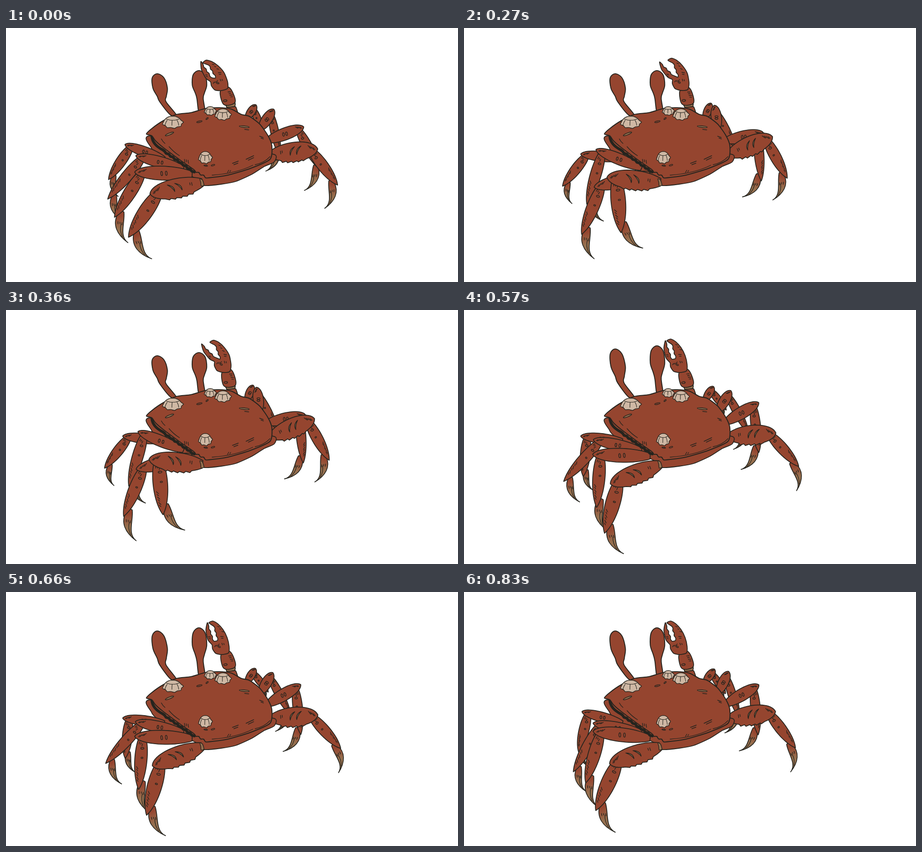
An HTML page with a canvas for the animation above (900 ms loop, 998 px wide and 561 px high).

```html
<!DOCTYPE html>
<html lang="en">
<head>
<meta charset="utf-8">
<title>Walking crab</title>
<style>
  html, body { margin: 0; width: 100%; height: 100%; overflow: hidden; background: #fff; }
  canvas { display: block; width: 100%; height: 100%; }
</style>
</head>
<body>
<canvas id="stage" width="998" height="561"></canvas>
<script>
const ctx = document.getElementById('stage').getContext('2d');
const RED = '#95452f', INK = '#25241e', SHELL = '#cfb8a4', HORN = '#96704f';
const POSES = 6, LOOP = 900, FIRST = 120, STEP = 150;
const rad = d => d * Math.PI / 180;

function paint(fill, width = 1.8) {
  if (fill) { ctx.fillStyle = fill; ctx.fill(); }
  ctx.strokeStyle = INK;
  ctx.lineWidth = width;
  ctx.stroke();
}

// Closed curve through the points; tension 0 gives straight edges.
function blob(pts, tension = 1) {
  const n = pts.length, k = tension / 6;
  ctx.beginPath();
  ctx.moveTo(...pts[0]);
  for (let i = 0; i < n; i++) {
    const a = pts[(i + n - 1) % n], b = pts[i], c = pts[(i + 1) % n], d = pts[(i + 2) % n];
    ctx.bezierCurveTo(b[0] + (c[0] - a[0]) * k, b[1] + (c[1] - a[1]) * k,
      c[0] - (d[0] - b[0]) * k, c[1] - (d[1] - b[1]) * k, c[0], c[1]);
  }
  ctx.closePath();
}

// Points from a to b that step aside at every other point.
function ragged(a, b, count, depth) {
  const dx = b[0] - a[0], dy = b[1] - a[1], len = Math.hypot(dx, dy);
  return Array.from({ length: count + 1 }, (_, i) => {
    const t = i / count, off = i % 2 ? depth / len : 0;
    return [a[0] + dx * t - dy * off, a[1] + dy * t + dx * off];
  });
}

function turned([x, y], cx, cy, deg) {
  const c = Math.cos(rad(deg)), s = Math.sin(rad(deg));
  return [cx + (x - cx) * c - (y - cy) * s, cy + (x - cx) * s + (y - cy) * c];
}

function arc(x1, y1, cx, cy, x2, y2, width = 1.4) {
  ctx.beginPath();
  ctx.moveTo(x1, y1);
  ctx.quadraticCurveTo(cx, cy, x2, y2);
  paint(null, width);
}

function slit(x, y, rx, ry, turn = 0, fill = RED) {
  ctx.beginPath();
  ctx.ellipse(x, y, rx, ry, rad(turn), 0, 7);
  paint(fill, 1.4);
}

function hatch(x, y, dx, dy, lx, ly, count) {
  for (let i = 0; i < count; i++) {
    const cut = i % 2 ? 0.7 : 1, px = x + dx * i, py = y + dy * i;
    arc(px, py, px, py, px + lx * cut, py + ly * cut);
  }
}

// Runs draw(length) with the x axis along a-b; +y is the inner side.
function along(a, b, side, draw) {
  const dx = b[0] - a[0], dy = b[1] - a[1];
  ctx.save();
  ctx.translate(...a);
  ctx.rotate(Math.atan2(dy, dx));
  ctx.scale(1, side);
  draw(Math.hypot(dx, dy));
  ctx.restore();
}

function spindle(len, w, root, c1, c2, toothed) {
  const N = 22, top = [], low = [];
  for (let i = 0; i <= N; i++) {
    const t = i / N, s = 1 - t;
    const x = len * (3 * s * s * t * c1 + 3 * s * t * t * c2 + t ** 3);
    const y = w * (s ** 3 * root + 3 * s * s * t * 0.64 + 3 * s * t * t * 0.6);
    const tooth = toothed && i > 4 && i < 14 && i % 2 ? 3 : 0;
    top.push([x, -y]);
    low.unshift([x - tooth, y + tooth]);
  }
  blob(top.concat(low), 0);
  paint(RED);
}

function upper(len, w) {
  const big = w > 35;
  spindle(len, w, 0.2, 0.3, 0.92, big);
  hatch(len * 0.8, -w * 0.24, len * 0.035, w * 0.05, len * 0.045, w * 0.17, 4);
  if (big) {
    for (const t of [0.48, 0.62]) {
      ctx.beginPath();
      ctx.moveTo(len * (t + 0.03), -w * 0.26);
      ctx.quadraticCurveTo(len * (t - 0.1), -w * 0.12, len * (t - 0.08), w * 0.16);
      ctx.quadraticCurveTo(len * (t - 0.06), -w * 0.06, len * (t + 0.03), -w * 0.26);
      paint(HORN, 1.5);
    }
    hatch(len * 0.2, -w * 0.12, len * 0.035, 0, 0, w * 0.16, 2);
  } else {
    slit(len * 0.45, 0, 2, w * 0.15, 8);
    slit(len * 0.53, w * 0.03, 2, w * 0.15, 8);
  }
}

function shin(len, w) {
  spindle(len, w, 0.25, 0.22, 0.76);
  hatch(len * 0.1, -w * 0.2, 2, w * 0.12, 5, -1, 3);
  slit(len * 0.22, w * 0.05, 2, w * 0.13);
  slit(len * 0.4, w * 0.08, 1.5, w * 0.08);
  hatch(len * 0.57, -w * 0.32, len * 0.05, w * 0.025, 5, w * 0.14, 6);
}

function hook(len) {
  const tint = ctx.createLinearGradient(0, 0, len, 0);
  tint.addColorStop(0.1, RED);
  tint.addColorStop(0.5, HORN);
  ctx.beginPath();
  ctx.moveTo(0, -len * 0.1);
  ctx.bezierCurveTo(len * 0.3, -len * 0.36, len * 0.65, -len * 0.3, len, 0);
  ctx.bezierCurveTo(len * 0.72, -len * 0.24, len * 0.35, len * 0.06, 0, len * 0.1);
  ctx.quadraticCurveTo(-len * 0.12, 0, 0, -len * 0.1);
  paint(tint);
  arc(len * 0.36, -len * 0.08, len * 0.55, -len * 0.18, len * 0.78, -len * 0.13, 1.3);
  hatch(len * 0.26, -len * 0.16, 2, len * 0.06, 5, -1, 3);
}

// Joint angle over the walk, in degrees: a swing once and a bob twice per loop.
const wave = (mean, swing = 0, lag = 0, bob = 0, bobLag = 0) => pose => {
  const turn = 360 * pose / POSES;
  return rad(mean + swing * Math.cos(rad(turn - lag)) + bob * Math.cos(rad(2 * turn - bobLag)));
};

// thigh: length, width, angle below the horizon; calf and claw: angle out from plumb.
function leg(side, hip, [l1, w1, lift], [l2, w2, spread], [l3, curl]) {
  return pose => {
    const a = lift(pose), b = spread(pose), c = curl(pose);
    const reach = ([x, y], len) => [x + side * len * Math.cos(a), y + len * Math.sin(a)];
    const drop = ([x, y], len, angle) => [x + side * len * Math.sin(angle), y + len * Math.cos(angle)];
    const knee = reach(hip, l1), top = reach(knee, -w2 * 0.65);
    const ankle = drop(top, l2, b);
    const root = drop(drop(ankle, -w2 * 0.6, b), w2 * 0.25, b - Math.PI / 2);
    along(root, drop(root, l3, c), side, hook);
    along(top, ankle, side, len => shin(len, w2));
    along(hip, knee, side, len => upper(len, w1));
  };
}

const farLegs = [
  leg(1, [531, 200], [37, 18, wave(-60, 7, -50)], [55, 16, wave(26, 12, 250)], [25, wave(-10)]),
  leg(1, [561, 224], [54, 23, wave(-71, 17, -66, 11, 42)], [95, 18, wave(23, 11, 180)], [50, wave(-29)]),
  leg(1, [576, 249], [87, 27, wave(-21, 11, 88)], [104, 21, wave(13.5, 5, 25, 11.5, 16)],
    [59, wave(-32, 0, 0, 6.5, 16)]),
  leg(1, [586, 279], [103, 42, wave(-11, 7, -64, 4.5, 73)], [98, 24, wave(36, 7, -111, 4, 20)],
    [61, wave(-8, 17, -111)])];
const nearLegs = [
  leg(-1, [350, 289], [93, 22, wave(-11, 9, 180)], [88, 22, wave(26, 20.5, 66)], [46, wave(-14, 6, 66)]),
  leg(-1, [392, 310], [109, 25, wave(-16.6, 6, -73)], [120, 24, wave(33, 6.7, -79, 10, 55)],
    [56, wave(-23, 6, -39)]),
  leg(-1, [411, 323], [127, 31, wave(3, 10, 121)], [117, 27, wave(19.6, 16.3, 40)], [68, wave(-13)])];
const frontLeg =
  leg(-1, [434, 341], [119, 42, wave(9.3, 12.4, -72, 3.7, 104)], [121, 32, wave(14.8, 15.4, -43, 8, 9)],
    [68, wave(-31, 7.3, -81)]);

function drawEye(x, top, lean, lift) {
  const foot = 192, rise = y => y - lift * Math.max(0, (172 - y) / (172 - top));
  const side = (w, d) => [[w * 13, 9], [w * 16, 32], [w * 10, 50], [w * 7, 62]]
    .map(([dx, dy]) => [x + dx + lean * dy * 0.2, rise(top + dy)])
    .concat([[x + lean * 35 + d, foot]]);
  blob([[x, rise(top)], ...side(1, 7), ...side(-1, -6).reverse()]);
  paint(RED, 2);
}

// Whole turn, thumb turn and finger turn of the raised claw.
function grip(pose) {
  if (pose === 0) return [-12, -12, -9];
  if (pose < 3) return [0, -36, -12];
  return pose === 3 ? [0, 0, 0] : [-7, -3, 0];
}

function drawClaw(pose) {
  const [turn, inner, outer] = grip(pose);
  blob([[488, 174], [507, 174], [512, 190], [486, 190]], 0.3);
  paint(RED);
  blob([[485, 167], [505, 164], [505, 173], [488, 175]], 0.5);
  paint(HORN);
  ctx.save();
  ctx.translate(491 + turn * 0.2, 151);
  ctx.rotate(rad(-9 + turn * 0.5));
  blob([[-7, -20], [8, -19], [14, -5], [14, 16], [0, 20], [-13, 14], [-14, -9]]);
  paint(RED);
  slit(-7, 8, 4, 2, 10);
  hatch(4, -9, 1, 4, 6, 1, 4);
  ctx.restore();

  const thumb = [...ragged([466, 107], [460, 72], 6, -2), [458, 64], [452, 80], [453, 102]];
  const finger = [[495, 102], [488, 83], [478, 69], [468, 62], [459, 65],
    ...ragged([468, 73], [473, 106], 6, -2)];
  ctx.save();
  ctx.translate(481 + turn * 0.4, 134);
  ctx.rotate(rad(turn));
  ctx.translate(-481, -134);
  blob([...thumb.map(p => turned(p, 462, 110, inner)),
    [460, 114], [460, 123], [466, 134], [480, 138], [494, 136], [497, 122],
    ...finger.map(p => turned(p, 485, 110, outer))], 0.7);
  paint(RED);
  hatch(465, 119, 4, -1, 3, -3, 3);
  slit(475, 120, 3, 1.5, 30);
  hatch(481, 98, 1, 4, 6, 1, 2);
  hatch(482, 113, 4, 1, 1, 4, 2);
  hatch(...turned([477, 75], 485, 110, outer), 4, 6, 4, 2, 3);
  hatch(...turned([455, 95], 462, 110, inner), 1, 4, 4, 1, 2);
  ctx.restore();
}

// Ragged skirt below a narrower crown, with ribs in between.
function barnacle(x, y, rx, ry) {
  const ring = [];
  for (let i = 0; i < 18; i++) {
    const a = rad(i * 20), low = Math.sin(a) > -0.2;
    const r = low ? 1 - 0.14 * (i % 2) : 0.95;
    ring.push([x + rx * r * Math.cos(a) * (low ? 1 : 0.85), y + ry * r * Math.sin(a)]);
  }
  blob(ring, 0.5);
  paint(SHELL, 1.4);
  arc(x - rx * 0.6, y - ry * 0.5, x, y - ry * 0.1, x + rx * 0.6, y - ry * 0.5, 1.1);
  for (const t of [-0.5, -0.05, 0.4])
    arc(x + rx * t, y - ry * 0.3, x + rx * t * 1.3, y, x + rx * t * 1.4, y + ry * 0.5, 1.1);
}

function drawUnderside() {
  blob([[321, 238], [321, 265], [335, 281], [380, 312], [428, 337], [438, 348], [475, 345],
    [507, 339], [543, 323], [570, 306], [592, 296], [594, 280], [540, 270]], 0.7);
  paint(RED);
}

function drawCarapace() {
  ctx.beginPath();
  ctx.moveTo(322, 240);
  ctx.quadraticCurveTo(324, 258, 346, 269);
  ragged([350, 272], [416, 318], 14, 2).forEach(p => ctx.lineTo(...p));
  paint(null, 6);
  blob([[310, 234], [322, 222], [345, 206], [376, 191], [408, 187], [440, 178], [470, 176],
    [497, 179], [520, 191], [537, 195], [560, 212], [578, 237], [587, 260], [583, 290],
    [540, 310], [490, 325], ...ragged([447, 331], [415, 313], 6, -3),
    [385, 292], [346, 263], [330, 249], [322, 238]], 0.7);
  paint(RED, 2.1);

  arc(360, 262, 370, 274, 383, 282);
  arc(343, 245, 346, 251, 351, 255);
  arc(455, 325, 510, 321, 545, 303, 1.3);
  arc(550, 302, 570, 298, 583, 284, 1.3);
  hatch(500, 299, 3, 3, 13, -5, 2);
  hatch(530, 290, 5, 2, 17, -8, 2);
  hatch(489, 319, 5, -1, 3, -5, 2);
  hatch(560, 239, 3, 4, 8, 3, 2);
  hatch(394, 290, 4, 1, 1, 7, 3);
  hatch(527, 224, 0, 0, 9, 1, 1);
  slit(361, 234, 10, 2, -22, HORN);
  slit(427, 207, 6, 1.5, -12);
  slit(444, 200, 3, 1.3, -40);
  slit(526, 218, 11, 1.7, 6, HORN);
  slit(441, 304, 4, 1.2, 8);
  slit(457, 303, 4, 1.4, -15);

  barnacle(368, 208, 24, 14);
  barnacle(479, 191, 19, 13);
  barnacle(451, 183, 14, 10);
  barnacle(440, 286, 16, 14);
}

function draw(pose) {
  ctx.fillStyle = '#fff';
  ctx.fillRect(0, 0, 998, 561);
  farLegs.forEach(step => step(pose));
  const lift = pose < 3 ? 0 : 15;
  drawEye(334, 101, 1, lift);
  drawEye(426, 94, 0.2, lift);
  drawClaw(pose);
  drawUnderside();
  nearLegs.forEach(step => step(pose));
  drawCarapace();
  frontLeg(pose);
  blob([[428, 333], [434, 336], [437, 347], [431, 349], [430, 341]], 0.7);
  paint(HORN, 1.4);
}

// The first pose is shorter and the last one longer than a step.
function poseAt(ms) {
  const t = ms % LOOP;
  return t < FIRST ? 0 : Math.min(POSES - 1, 1 + Math.floor((t - FIRST) / STEP));
}

ctx.lineJoin = ctx.lineCap = 'round';
const start = performance.now();
function tick() {
  draw(poseAt(performance.now() - start));
  requestAnimationFrame(tick);
}
tick();
</script>
</body>
</html>
```
